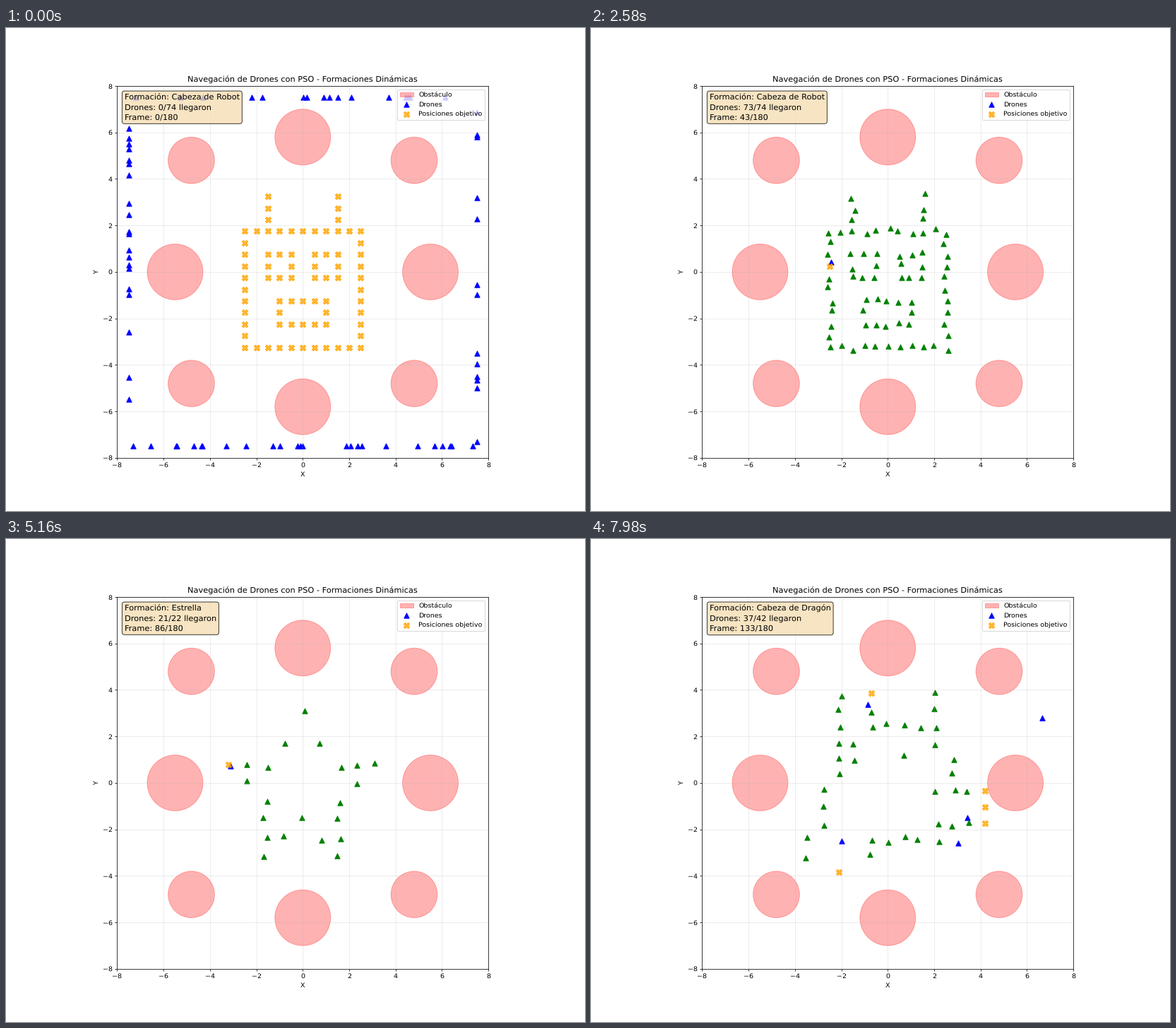
A matplotlib script for the animation above (8000 ms loop, 820 by 683 pixels).

```python
import math
import numpy as np
import matplotlib.pyplot as plt
from matplotlib.animation import FuncAnimation

plt.rcParams["font.family"] = "DejaVu Sans"
plt.rcParams["text.hinting"] = "none"

DPI = 820 / 12
PHASE = 45      # steps per formation
TOTAL = 180
EDGE = 7.5      # drones start on this square
SPREAD = 0.13   # how far from its target a drone may stop

OBSTACLES = [(x, y, 1.0) for x in (-4.8, 4.8) for y in (-4.8, 4.8)]
OBSTACLES += [(0, 5.8, 1.2), (0, -5.8, 1.2), (5.5, 0, 1.2), (-5.5, 0, 1.2)]


def trace(step, paths):
    """Unit-spaced points along polylines, without repeats."""
    pts = []
    for path in paths:
        pts.append(path[0])
        for (x0, y0), (x1, y1) in zip(path, path[1:]):
            n = int(max(abs(x1 - x0), abs(y1 - y0)))
            pts += [(x0 + (x1 - x0) * i / n, y0 + (y1 - y0) * i / n)
                    for i in range(1, n + 1)]
    return step * np.array(list(dict.fromkeys(pts)))


def box(x0, x1, y0, y1):
    return [(x0, y0), (x1, y0), (x1, y1), (x0, y1), (x0, y0)]


def robot():
    antennas = [[(x, 6.5), (x, 4.5)] for x in (-3, 3)]
    eyes = [box(-3, -1, 1.5, -0.5), box(1, 3, 1.5, -0.5)]
    mouth = box(-2, 2, -2.5, -4.5)
    return trace(0.5, antennas + eyes + [mouth, box(-5, 5, 3.5, -6.5)])


def star():
    half = [(0, 4), (1, 2), (2, 1), (3, 1), (4, 1), (3, 0), (2, -1), (2, -2),
            (0, -2), (1, -3), (2, -3), (2, -4)]
    return trace(0.8, [[(s * x, y)] for x, y in half for s in (-1, 1)])


def dragon():
    horns = [[(-3, 5.5), (-3, 0.5)], [(3, 5.5), (3, 2.5)],
             [(-1, 5.5), (-1, 3.5), (3, 3.5)]]
    face = [[(-2, 2.5), (-2, 1.5)], [(1, 1.5)], [(4, 1.5), (4, -0.5)]]
    jaw = [(3, -0.5), (6, -0.5), (6, -2.5), (3, -2.5), (3, -3.5),
           (-1, -3.5), (-1, -4.5)]
    neck = [[(-4, -0.5), (-4, -2.5)], [(-5, -3.5), (-5, -4.5)], [(-3, -5.5)]]
    return trace(0.7, horns + face + [jaw] + neck)


def border_points(n, rng):
    along = rng.uniform(-EDGE, EDGE, n)
    side = rng.integers(4, size=n)
    fixed = np.where(side % 2, EDGE, -EDGE)
    flat = side < 2
    return np.column_stack([np.where(flat, along, fixed),
                            np.where(flat, fixed, along)])


def by_angle(pts):
    return np.argsort(np.arctan2(pts[:, 1], pts[:, 0]))


def dodge(p):
    for ox, oy, r in OBSTACLES:
        d = p - (ox, oy)
        dist = math.hypot(*d)
        if dist < r + 0.3:
            return np.array((ox, oy)) + d / max(dist, 1e-6) * (r + 0.3)
    return p


def place(keys, t):
    for (t0, a), (t1, b) in zip(keys, keys[1:]):
        if t < t1:
            u = (t - t0) / (t1 - t0)
            return dodge(a + (b - a) * (1 - math.exp(-4 * u)) / (1 - math.exp(-4)))
    return keys[-1][1]


class Formation:
    """arrivals: (step, drones landed); stragglers: {target: hover point}."""

    def __init__(self, name, targets, arrivals, stragglers, seed):
        rng = np.random.default_rng(seed)
        n = len(targets)
        self.name, self.targets = name, targets
        steps, counts = zip(*arrivals)

        hover = {}
        for goal, point in stragglers.items():
            gap = np.hypot(*(targets - goal).T)
            hover[int(gap.argmin())] = np.array(point)

        # outer targets fill last, stragglers after all others
        order = np.abs(targets).max(axis=1) + rng.normal(0, 0.7, n)
        order[list(hover)] += 99
        rank = order.argsort().argsort() + 1
        self.landing = np.ceil(np.interp(rank, counts, steps)).astype(int)

        ends = targets + rng.uniform(-SPREAD, SPREAD, (n, 2))
        starts = border_points(n, rng)
        self.keys = [None] * n
        for s, i in zip(by_angle(starts), by_angle(ends)):
            stop = [(steps[-2], hover[i])] if i in hover else []
            self.keys[i] = [(0, starts[s]), *stop, (self.landing[i], ends[i])]

    def state(self, t):
        pos = np.array([place(k, t) for k in self.keys])
        return pos, self.landing <= t


FORMATIONS = [
    Formation("Cabeza de Robot", robot(),
              [(2, 0), (21, 53), (43, 73), (50, 74)],
              {(-2.5, 0.25): (-2.43, 0.42)}, 3),
    Formation("Estrella", star(),
              [(2, 0), (20, 18), (31, 20), (42, 22)],
              {(-3.2, 0.8): (-2.9, -1.57), (-2.4, 0.8): (-2.2, 0.63)}, 5),
    Formation("Cabeza de Dragón", dragon(),
              [(2, 0), (4, 8), (23, 34), (43, 37), (90, 42)],
              {(-0.7, 3.85): (-0.87, 3.38), (4.2, -0.35): (6.65, 2.79),
               (4.2, -1.05): (3.43, -1.5), (4.2, -1.75): (3.03, -2.6),
               (-2.1, -3.85): (-2, -2.5)}, 8),
]

fig, ax = plt.subplots(figsize=(820.01 / DPI, 683.01 / DPI), dpi=DPI)
ax.set_xlim(-8, 8)
ax.set_ylim(-8, 8)
ax.set_aspect("equal")
ax.grid(True, alpha=0.3)
ax.set_title("Navegación de Drones con PSO - Formaciones Dinámicas")
ax.set_xlabel("X")
ax.set_ylabel("Y")

for k, (ox, oy, r) in enumerate(OBSTACLES):
    ax.add_patch(plt.Circle((ox, oy), r, color="red", alpha=0.3,
                            label="" if k else "Obstáculo"))

flying = ax.scatter([], [], color="blue", marker="^", s=60, label="Drones")
landed = ax.scatter([], [], color="green", marker="^", s=60)
goals = ax.scatter([], [], color="orange", marker="X", s=80, alpha=0.8,
                   label="Posiciones objetivo")
info = ax.text(0.02, 0.98, "", transform=ax.transAxes, fontsize=12, va="top",
               linespacing=1.45,
               bbox=dict(boxstyle="round", facecolor="wheat", alpha=0.8))
ax.legend(loc="upper right")


def update(i):
    step = (2 * i + 1) // 3      # 40 ms ticks, 60 ms steps
    form = FORMATIONS[step // PHASE]
    pos, done = form.state(step % PHASE)
    flying.set_offsets(pos[~done])
    landed.set_offsets(pos[done])
    goals.set_offsets(form.targets[~done])
    info.set_text(f"Formación: {form.name}\n"
                  f"Drones: {done.sum()}/{len(done)} llegaron\n"
                  f"Frame: {step}/{TOTAL}")
    return flying, landed, goals, info


anim = FuncAnimation(fig, update, frames=200, interval=40,
                     init_func=lambda: update(0), repeat=True, repeat_delay=0)
plt.show()
```
